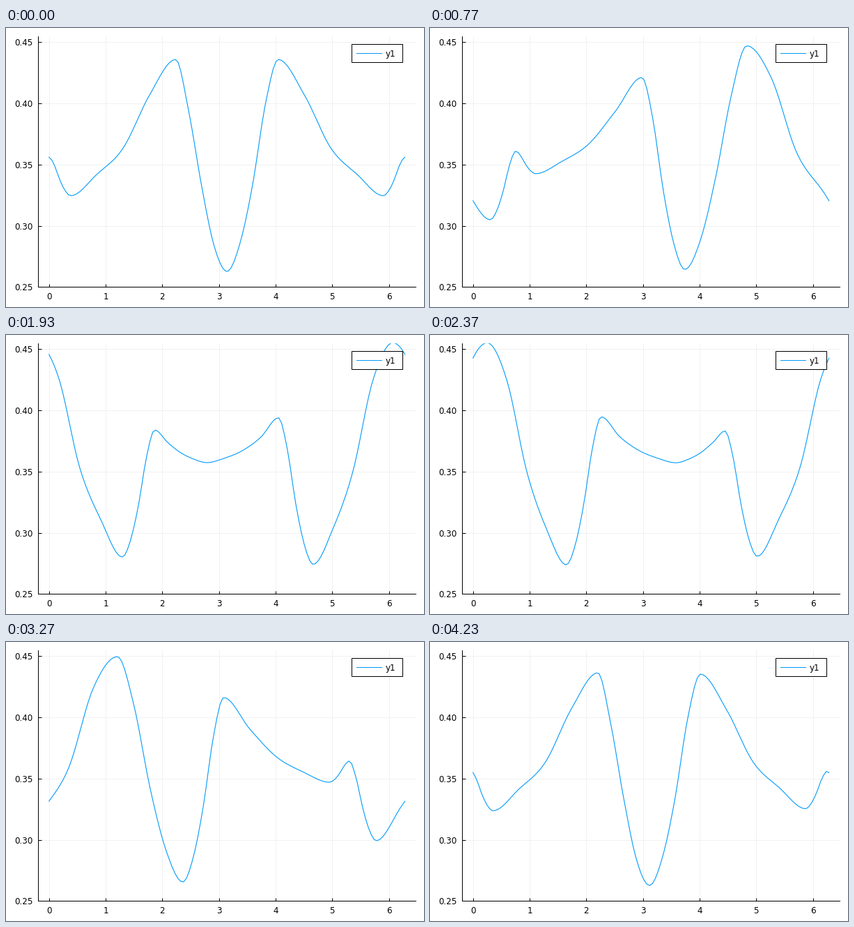
Recreate the animation shown at these times as a matplotlib script. Size 600 by 400 pixels, loop 4260 ms.

```python
import numpy as np
import matplotlib.pyplot as plt
from matplotlib.animation import FuncAnimation
from matplotlib.lines import Line2D
from matplotlib.patches import Rectangle

W, H, DPI = 600, 400, 100
LOOP, TICK = 4260, 20          # ms
STEPS, RATE = 128, 0.03        # wave steps per loop, steps per ms
PX = 72 / DPI                  # one pixel in points
BLUE = "#009AF9"
TAU = 2 * np.pi
QUARTERS = np.array([0.25, 0.5, 0.75])

plt.rcParams.update({"font.family": "DejaVu Sans", "font.size": 11.9 * PX})


def crest(k, t):
    """Place and height of crest k, which drifts at 2/3 of the phase speed."""
    base = q = (TAU * k - t) / 3
    for _ in range(4):
        q = base + (0.32 * np.sin(q) - 0.18 * np.sin(2 * q)) / 3
    c, s2 = np.cos(q), np.sin(q) ** 2
    return t + q, 0.4058 - 0.0497 * c + 0.004 * s2 * (1 + 2 * c)


def trough(k, t):
    """Place and height of the trough after crest k, and its two flanks."""
    center = (2 * t + TAU * k + np.pi) / 3
    q = (center - t + np.pi) % TAU - np.pi
    side, q = (1 if q >= 0 else -1), abs(q)
    c, s2 = np.cos(q), np.sin(q) ** 2
    lean = np.tanh(25 * q * q)
    x = center - side * 0.7 * np.sin(0.6 * (np.pi - q)) * lean
    y = 0.3102 + 0.0475 * c - 0.0125 * s2
    gentle = np.array([0.11 - 0.01 * c + 0.07 * s2,
                       0.34 - 0.07 * c + 0.06 * s2,
                       0.66 - 0.10 * c + 0.17 * s2])
    steep = gentle + lean * (np.array([0.13, 0.41, 0.79]) - gentle)
    flanks = (steep, gentle) if side > 0 else (gentle, steep)
    return x, y, flanks


def knots(t):
    """Crests, troughs and three points on every flank, from left to right."""
    px, py = [], []
    for k in range(-4, 6):
        ax_, ay = crest(k, t)
        bx, by = crest(k + 1, t)
        mx, my, (left_flank, right_flank) = trough(k, t)
        px += [ax_, *(mx + (ax_ - mx) * QUARTERS[::-1]),
               mx, *(mx + (bx - mx) * QUARTERS)]
        py += [ay, *(my + (ay - my) * left_flank[::-1]),
               my, *(my + (by - my) * right_flank)]
    return np.array(px), np.array(py)


def hermite(x, px, py):
    slope = np.zeros_like(py)
    slope[1:-1] = (py[2:] - py[:-2]) / (px[2:] - px[:-2])
    slope[::4] = 0             # crests and troughs are level
    i = np.clip(np.searchsorted(px, x) - 1, 0, len(px) - 2)
    h = px[i + 1] - px[i]
    u = (x - px[i]) / h
    rise = u * u * (3 - 2 * u)
    return (py[i] + (py[i + 1] - py[i]) * rise
            + h * u * (1 - u) * ((1 - u) * slope[i] - u * slope[i + 1]))


xs = np.linspace(0, TAU, 128)


def wave(step):
    return hermite(xs, *knots(TAU * step / STEPS))


fig = plt.figure(figsize=(W / DPI, H / DPI), dpi=DPI, facecolor="white")
left, right, top, bottom = 46.4, 588, 11.6, 371.4
ax = fig.add_axes([left / W, 1 - bottom / H, (right - left) / W, (bottom - top) / H])
margin = 0.03 * TAU
ax.set_xlim(-margin, TAU + margin)
ax.set_ylim(0.25, 0.455)
ax.set_xticks(range(7))
ax.set_yticks([0.25, 0.30, 0.35, 0.40, 0.45])
ax.yaxis.set_major_formatter("{x:.2f}")
ax.tick_params(direction="in", length=4.5 * PX, width=PX)
ax.tick_params(axis="x", pad=7.8 * PX)
ax.tick_params(axis="y", pad=8 * PX)
ax.grid(color="0.945", linewidth=PX)
ax.set_axisbelow(True)
ax.spines[["top", "right"]].set_visible(False)
ax.spines[["left", "bottom"]].set_linewidth(PX)
curve, = ax.plot(xs, wave(0), color=BLUE, linewidth=1.1 * PX)

# Legend, placed in pixels over the curve.
fig.add_artist(Rectangle((496.4, H - 49.4), 73, 26, facecolor="white",
                         edgecolor="black", linewidth=PX, transform=None))
fig.add_artist(Line2D([502.5, 539], [H - 36.4] * 2, color=BLUE,
                      linewidth=PX, transform=None))
fig.text(544.5, H - 41, "y1", transform=None)


def update(i):
    time = (i + 0.5) * TICK
    curve.set_ydata(wave(int((time + 5) * RATE)))
    return curve,


anim = FuncAnimation(fig, update, frames=LOOP // TICK, interval=TICK,
                     repeat=True, repeat_delay=0)
plt.show()
```
